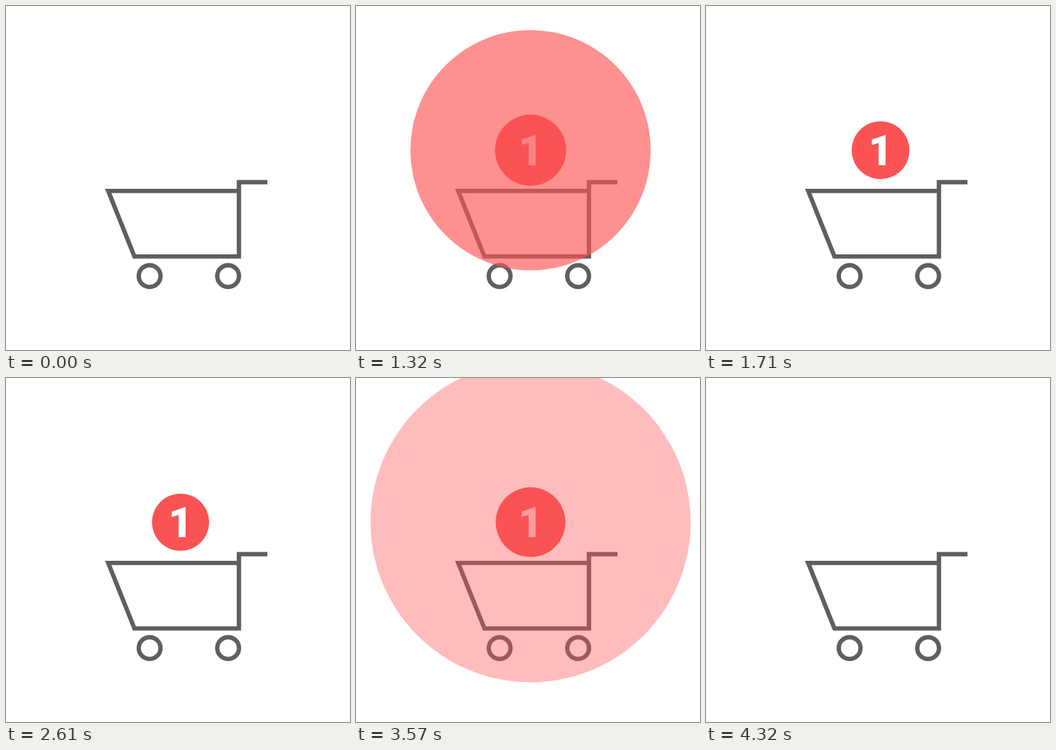
An HTML page for the animation above (4950 ms loop, 525 px wide and 525 px high).

```html
<!DOCTYPE html>
<html lang="en">
<head>
<meta charset="utf-8">
<title>Cart badge</title>
<style>
  html, body { margin: 0; width: 100%; height: 100%; overflow: hidden; background: #fff; }
  svg { display: block; width: 100%; height: 100%; }
  .cart { fill: none; stroke: #5f5f5f; stroke-width: 6.64; }
  #ripple { fill: #ff5454; }
  #badge { fill: #fb5353; }
  #count { fill: #fff; font: 900 64.5px Roboto, sans-serif; text-anchor: middle; }
</style>
</head>
<body>
<svg viewBox="0 0 525 525">
  <g class="cart">
    <path d="M355.5 282.3H156L196 382.2H355.5V268.9H399"/>
    <circle cx="219.2" cy="412.2" r="16.6"/>
    <circle cx="339" cy="412.2" r="16.6"/>
  </g>
  <circle id="ripple" cx="266.4" cy="220.1"/>
  <circle id="badge" cx="266.4"/>
  <text id="count" x="266.4" y="242.6">1</text>
</svg>
<script>
  const LOOP = 4950;
  const DOT = 9.9, FULL = 43.6, TOP = 220.1, RISE = 50.5;
  const [ripple, badge, count] = ['ripple', 'badge', 'count'].map(id => document.getElementById(id));

  const progress = (t, start, length) => Math.min(1, Math.max(0, (t - start) / length));
  const sineInOut = p => (1 - Math.cos(Math.PI * p)) / 2;
  const elasticOut = p => p <= 0 ? 0 : p >= 1 ? 1 :
    1 + 2 ** (-10 * p) * Math.sin((p - 0.075) * 2 * Math.PI / 0.3);

  function set(el, attrs) {
    for (const name in attrs) el.setAttribute(name, attrs[name]);
  }

  function draw(time) {
    // The second half plays the first half backwards.
    const t = Math.min(time, LOOP - time);
    const rise = progress(t, 640, 260);
    const wave = progress(t, 1085, 358);
    const grow = elasticOut(progress(t, 1210, 1000));

    set(badge, {
      cy: TOP + RISE * (1 - sineInOut(rise)),
      r: DOT + (FULL - DOT) * grow,
      opacity: Math.min(1, rise * 2)
    });
    set(ripple, {
      r: DOT + 307 * wave ** 1.37,
      opacity: wave > 0 ? 1 - wave ** 2.5 : 0
    });
    set(count, { opacity: progress(t, 1210, 400) });
  }

  const begin = performance.now();
  function tick() {
    draw((performance.now() - begin) % LOOP);
    requestAnimationFrame(tick);
  }
  draw(0);
  requestAnimationFrame(tick);
</script>
</body>
</html>
```
